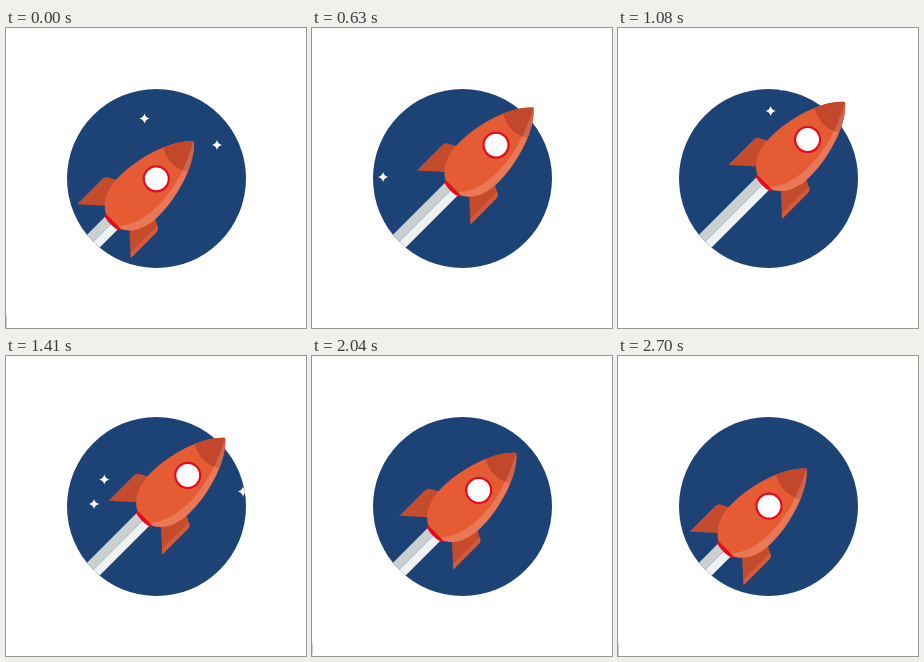
Recreate the animation shown at these times as an HTML page. Size 300 by 300 pixels, loop 2.73 s.

```html
<!DOCTYPE html>
<html lang="en">
<head>
<meta charset="utf-8">
<title>Rocket</title>
<style>
  html, body { margin: 0; width: 100%; height: 100%; overflow: hidden; background: #fff; }
  svg { display: block; width: 100%; height: 100%; }
</style>
</head>
<body>
<svg viewBox="0 0 300 300">
  <defs>
    <clipPath id="disc"><circle cx="150.5" cy="150.5" r="89.5"/></clipPath>
    <clipPath id="sky">
      <circle cx="150.5" cy="150.5" r="89.5"/>
      <rect width="1" height="300"/>
    </clipPath>
    <clipPath id="hull">
      <path id="body" d="M0-53C16-40 28-5 28 25C28 42 22 54 11 60.5H-11C-22 54-28 42-28 25C-28-5-16-40 0-53Z"/>
    </clipPath>
  </defs>

  <circle cx="150.5" cy="150.5" r="89.5" fill="#1d4276"/>
  <g id="stars" clip-path="url(#disc)" fill="#fff"></g>

  <g clip-path="url(#sky)">
    <g class="ship">
      <path fill="#c9d0ce" d="M-9.5 62H0V234H-9.5Z"/>
      <path fill="#eef2f1" d="M0 62H8.5V234H0Z"/>
    </g>
  </g>

  <g class="ship">
    <path fill="#c44c2d" d="M-38 74V38Q-38 34-34 32.5L-24 27L-17 55Z"/>
    <path fill="#c44c2d" d="M38 74V38Q38 34 34 32.5L24 27L17 55Z"/>
    <path fill="#d55b3a" d="M38 74V38Q38 34 34 32.5V70.5Z"/>
    <path fill="#e30b1c" d="M-11 58H11L10.5 63Q0 66-10.5 63Z"/>
    <use href="#body" fill="#e55b33"/>
    <g clip-path="url(#hull)">
      <path fill="#c2472b" d="M-30-60H30V-27H17Q0-17-17-27H-30Z"/>
      <path fill="#fff" fill-opacity=".17" d="M0-53C8-38 22-8 20 22C19 44 12 54 6 61H40V-53Z"/>
    </g>
    <circle r="12.5" fill="#fff" stroke="#e30b1c" stroke-width="2.2"/>
  </g>
</svg>
<script>
  const LOOP = 2730, STEP = 30, PEAK = 840, REACH = 45;
  const NS = 'http://www.w3.org/2000/svg';
  const ships = document.querySelectorAll('.ship');
  const layer = document.getElementById('stars');

  // Each star passes (x, y) at time t, with velocity (vx, vy) in px per ms.
  const fast = { vx: -0.196, vy: 0.197 };
  const stars = [
    { t: 0, x: 138.5, y: 90.5, vx: -0.107, vy: 0.093 },
    { t: 0, x: 211, y: 117, ...fast },
    { t: 1080, x: 152.7, y: 83, ...fast },
    { t: 1080, x: 163, y: 58.5, ...fast },
    { t: 1740, x: 172.3, y: 200.5, ...fast }
  ];
  for (const s of stars) {
    s.el = document.createElementNS(NS, 'path');
    s.el.setAttribute('d', 'M0-5Q.9-.9 5 0Q.9.9 0 5Q-.9.9-5 0Q-.9-.9 0-5Z');
    layer.appendChild(s.el);
  }

  function draw(t) {
    const d = REACH * (t < PEAK ? t / PEAK : (LOOP - t) / (LOOP - PEAK));
    for (const ship of ships) {
      ship.setAttribute('transform', `translate(${150.3 + d} ${150.8 - d}) rotate(45)`);
    }
    for (const s of stars) {
      const dt = t - s.t;
      s.el.setAttribute('transform', `translate(${s.x + s.vx * dt} ${s.y + s.vy * dt})`);
    }
  }

  const start = performance.now();
  function tick() {
    const t = (performance.now() - start) % LOOP;
    draw(Math.floor(t / STEP) * STEP);
    requestAnimationFrame(tick);
  }
  tick();
</script>
</body>
</html>
```
